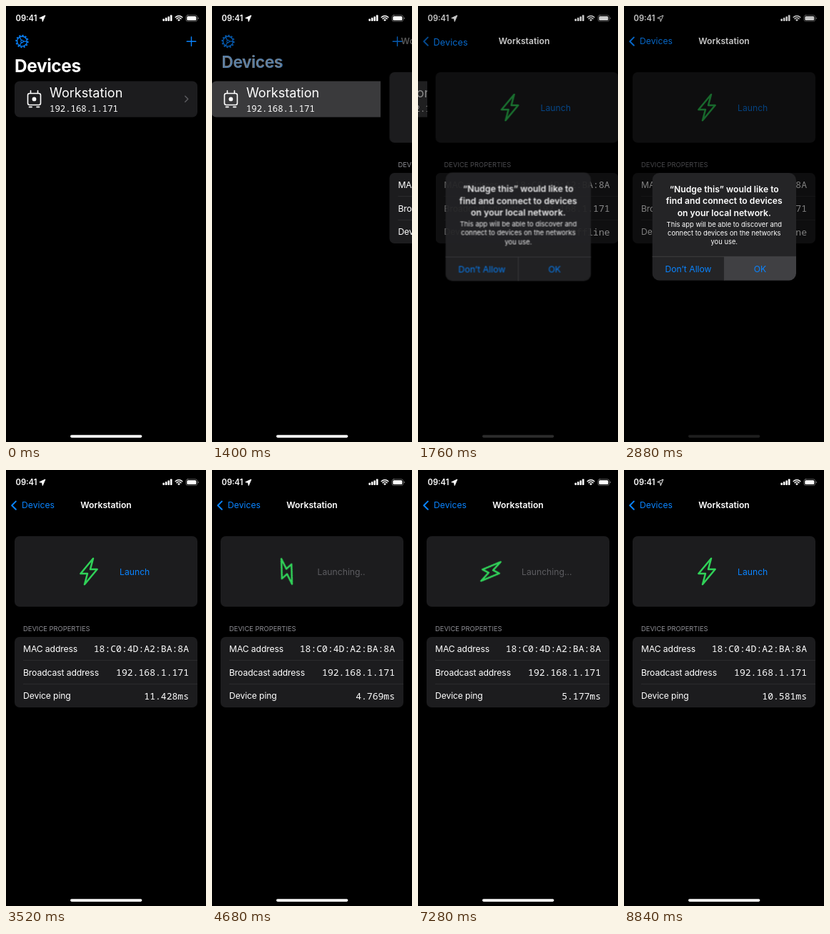
Animation of 280 by 606 pixels, one loop 9000 ms. Source, as an HTML page:

```html
<!DOCTYPE html>
<html lang="en">
<head>
<meta charset="utf-8">
<title>Devices</title>
<style>
html, body { margin: 0; width: 100%; height: 100%; overflow: hidden; background: #000; }
svg { display: block; width: 100%; height: 100%; }
text { font-family: Inter, Roboto, sans-serif; font-size: 12.2px; fill: #fff; white-space: pre; }
.mono { font-family: "Noto Sans Mono", "DejaVu Sans Mono", monospace; font-size: 13.07px; }
.semi { font-weight: 600; }
.mid { text-anchor: middle; }
.end { text-anchor: end; }
.small { font-size: 9.4px; }
.row { letter-spacing: -.12px; }
.blue { fill: #0a84ff; }
.card { fill: #1c1c1e; }
.line { fill: none; stroke-linecap: round; stroke-linejoin: round; }
.rule { stroke: #38383a; stroke-width: .6; }

#list, #detail, #title, #large, #back, #tools, #chevron, #rowcard, #dim, #bars, #home,
#alert, #pressed, #shift, #spin { animation: 9s linear infinite; }
#list, #detail, #title, #large, #back { --push: cubic-bezier(.22, .65, .2, 1); }

#list { animation-name: list; }
@keyframes list {
  0%, 14.667% { transform: translateX(0); animation-timing-function: var(--push); }
  21.333%, 100% { transform: translateX(-84px); }
}
#rowcard { animation-name: rowcard; }
@keyframes rowcard {
  0%, 14.66% { fill: #1c1c1e; }
  14.667%, 100% { fill: #3a3a3c; }
}
#detail { animation-name: detail; }
@keyframes detail {
  0%, 14.667% { transform: translateX(280px); animation-timing-function: var(--push); }
  21.333%, 100% { transform: translateX(0); }
}
#title { animation-name: slide, fadein; }
@keyframes slide {
  0%, 14.667% { transform: translateX(190px); animation-timing-function: var(--push); }
  21.333%, 100% { transform: translateX(0); }
}
@keyframes fadein {
  0%, 14.667% { opacity: 0; }
  17.333%, 100% { opacity: 1; }
}
#large { animation-name: shrink, fadeout; }
@keyframes shrink {
  0%, 14.667% { transform: translate(12px, 92px) scale(1); animation-timing-function: var(--push); }
  21.333%, 100% { transform: translate(22px, 53.4px) scale(.49); }
}
@keyframes fadeout {
  0%, 14.667% { opacity: 1; }
  16.444%, 100% { opacity: 0; }
}
#back { animation-name: settle, fadein; }
@keyframes settle {
  0%, 14.667% { transform: translate(12px, 92px) scale(2.05); animation-timing-function: var(--push); }
  21.333%, 100% { transform: translate(22px, 53.4px) scale(1); }
}
#tools { animation-name: tools; }
@keyframes tools {
  0%, 14.667% { opacity: 1; }
  17.333% { opacity: .12; }
  18.5%, 100% { opacity: 0; }
}
#chevron { animation-name: chevron; }
@keyframes chevron {
  0%, 17.333% { opacity: 0; }
  20.5%, 100% { opacity: 1; }
}
#dim { animation-name: dim; }
@keyframes dim {
  0%, 16.222% { opacity: 0; animation-timing-function: cubic-bezier(.22, .65, .2, 1); }
  22.222%, 33.333% { opacity: .5; }
  36.667%, 100% { opacity: 0; }
}
#bars { animation-name: bars; }
@keyframes bars {
  0%, 16.222% { opacity: 1; animation-timing-function: cubic-bezier(.22, .65, .2, 1); }
  22.222%, 33.333% { opacity: .78; }
  36.667%, 100% { opacity: 1; }
}
#home { animation-name: home; }
@keyframes home {
  0%, 16.222% { opacity: 1; animation-timing-function: cubic-bezier(.22, .65, .2, 1); }
  22.222%, 34.5% { opacity: .12; }
  38.889%, 100% { opacity: 1; }
}
#alert { transform-origin: 140.5px 306.5px; animation-name: pop, show; }
@keyframes pop {
  0%, 16.222% { transform: scale(1.2); animation-timing-function: cubic-bezier(.22, .65, .2, 1); }
  22.222%, 100% { transform: scale(1); }
}
@keyframes show {
  0%, 16.222% { opacity: 0; animation-timing-function: cubic-bezier(.22, .65, .2, 1); }
  22.222%, 33.333% { opacity: 1; }
  36.667%, 100% { opacity: 0; }
}
#pressed { animation-name: pressed; }
@keyframes pressed {
  0%, 31.99% { opacity: 0; }
  32%, 100% { opacity: 1; }
}
#shift { animation-name: shift; }
@keyframes shift {
  0%, 48.889% { transform: translateX(0); }
  50.667% { transform: translateX(-9px); }
  52% { transform: translateX(-11.4px); }
  53.333%, 87.111% { transform: translateX(-14px); animation-timing-function: ease-in-out; }
  89.778%, 100% { transform: translateX(0); }
}
#spin { animation-name: spin; }
@keyframes spin {
  0%, 48.889% { transform: rotate(0deg); }
  52% { transform: rotate(138deg); }
  53.778%, 80.889% { transform: rotate(207deg); animation-timing-function: cubic-bezier(.35, .4, .6, 1); }
  90.222%, 100% { transform: rotate(540deg); }
}
</style>
</head>
<body>
<svg viewBox="0 0 280 606" preserveAspectRatio="none">
  <rect width="280" height="606"/>

  <g id="list">
    <rect id="rowcard" class="card" x="12" y="104.5" width="256" height="50" rx="7"/>
    <g class="line" stroke="#fff" stroke-width="1.6">
      <rect x="30.5" y="121.5" width="18" height="16" rx="2.5"/>
      <path d="M34.5 121v-3.2M44.5 121v-3.2M32.5 140.4h3.6M43 140.4h3.6"/>
    </g>
    <circle cx="39.5" cy="129.4" r="2.9" fill="#fff"/>
    <text x="61" y="127.4" style="font-size:18.1px">Workstation</text>
    <text class="mono" x="61" y="147" style="font-size:12.3px">192.168.1.171</text>
    <path class="line" d="M250.8 125.2l4 4-4 4" stroke="#5c5c60" stroke-width="1.5"/>
  </g>

  <g id="detail">
    <rect width="280" height="606"/>
    <rect class="card" x="12" y="92" width="256" height="98" rx="7"/>
    <g id="shift">
      <g transform="translate(116 141)">
        <path id="spin" class="line" stroke="#30d158" stroke-width="2.5"
          d="M6 -18L-11.6 3H-2L-6 18L11.6 -3H2Z"/>
      </g>
      <text id="label" x="159" y="145.6"></text>
    </g>
    <text class="small" x="24" y="224" style="fill:#8d8d93">DEVICE PROPERTIES</text>
    <rect class="card" x="12" y="232" width="256" height="98" rx="7"/>
    <path class="rule" d="M24 264.6H268M24 297.4H268"/>
    <text class="row" x="24" y="252.8">MAC address</text>
    <text class="mono end" x="256" y="253">18:C0:4D:A2:BA:8A</text>
    <text class="row" x="24" y="285.6">Broadcast address</text>
    <text class="mono end" x="256" y="285.8">192.168.1.171</text>
    <text class="row" x="24" y="318.4">Device ping</text>
    <text id="ping" class="mono end" x="256" y="318.6"></text>
  </g>

  <rect id="dim" width="280" height="606"/>

  <g id="bars">
    <text class="semi" x="13.5" y="21" style="font-size:11.2px">09:41</text>
    <path id="arrow" class="line" d="M54.6 13.2L46.8 16.8L50.6 17.4L51.2 21.2Z" stroke="#fff" stroke-width="1"/>
    <g fill="#fff">
      <rect x="219.4" y="17.8" width="2.6" height="3.2" rx=".7"/>
      <rect x="222.9" y="16.2" width="2.6" height="4.8" rx=".7"/>
      <rect x="226.4" y="14.4" width="2.6" height="6.6" rx=".7"/>
      <rect x="229.9" y="12.6" width="2.6" height="8.4" rx=".7"/>
      <path d="M242 21.2l-1.9-2a2.7 2.7 0 0 1 3.8 0z"/>
      <rect x="253.3" y="14.2" width="13" height="5.8" rx="1.5"/>
      <path d="M268.7 15.7q1.3.4 1.3 1.4t-1.3 1.4z" opacity=".5"/>
    </g>
    <path class="line" d="M237.2 15.7a6.8 6.8 0 0 1 9.6 0M239 17.7a4.3 4.3 0 0 1 6 0" stroke="#fff" stroke-width="1.5"/>
    <rect class="line" x="251.9" y="12.8" width="15.8" height="8.6" rx="2.6" stroke="#fff" stroke-opacity=".5" stroke-width=".7"/>

    <g id="tools" class="line" stroke="#0a84ff" stroke-width="1.4">
      <circle cx="22.5" cy="49.2" r="6.9"/>
      <circle cx="22.5" cy="49.2" r="8.3" stroke-width="1.7" stroke-linecap="butt" pathLength="24" stroke-dasharray="1 1"/>
      <circle cx="22.5" cy="49.2" r="1.7" stroke-width="1.1"/>
      <path d="M24.2 49.2h5.2M21.6 47.7l-2.6 -4.5M21.6 50.7l-2.6 4.5" stroke-width="1.2"/>
      <path d="M253.2 49.2h12.6M259.5 42.9v12.6"/>
    </g>
    <text id="large" style="font-size:24.4px;font-weight:700;letter-spacing:-.4px">Devices</text>
    <path id="chevron" class="line" d="M13.8 43.6L8.2 49.2L13.8 54.8" stroke="#0a84ff" stroke-width="2"/>
    <text id="back" class="blue">Devices</text>
    <text id="title" class="semi mid" x="140" y="53.4">Workstation</text>
  </g>
  <rect id="home" x="90" y="596.3" width="100.4" height="3.6" rx="1.8" fill="#fff"/>

  <g id="alert">
    <clipPath id="round"><rect x="39.5" y="232" width="201.5" height="149.5" rx="10"/></clipPath>
    <g clip-path="url(#round)">
      <rect x="39" y="231" width="203" height="152" fill="#242426"/>
      <rect id="pressed" x="140.5" y="348.4" width="102" height="35" fill="#404043"/>
      <path d="M39 348.3H242M140.4 348.3V383" stroke="#48484b" stroke-width=".7"/>
    </g>
    <g class="semi mid">
      <text x="140.3" y="259.2">“Nudge this” would like to</text>
      <text x="140.3" y="275.4">find and connect to devices</text>
      <text x="140.3" y="291.6">on your local network.</text>
    </g>
    <g class="mid">
      <text class="small" x="140.3" y="306.6">This app will be able to discover and</text>
      <text class="small" x="140.3" y="318.6">connect to devices on the networks</text>
      <text class="small" x="140.3" y="330.6">you use.</text>
      <text class="blue" x="90" y="369.8">Don’t Allow</text>
      <text class="blue" x="190.5" y="369.8">OK</text>
    </g>
  </g>
</svg>
<script>
const $ = id => document.getElementById(id);
const clock = $("spin").getAnimations()[0];

// Each entry holds from its time until the next one.
const pings = [
  [0, "Offline"], [3400, "11.428ms"], [4400, "4.769ms"], [5400, "4.914ms"],
  [6400, "10.236ms"], [6600, "5.177ms"], [7400, "6.038ms"], [8600, "10.581ms"]
];
const labels = [
  [0, "Launch"], [4400, "Launching"], [4520, "Launching."],
  [4640, "Launching.."], [4800, "Launching..."], [7840, "Launch"]
];
const arrows = [[0, "#fff"], [2400, "none"], [3400, "#fff"], [8200, "none"]];

const at = (steps, t) => steps.filter(s => s[0] <= t).pop()[1];
const write = (el, s) => { if (el.textContent !== s) el.textContent = s; };

function draw() {
  const t = Math.max(0, clock.currentTime || 0) % 9000;
  const label = at(labels, t);
  write($("ping"), at(pings, t));
  write($("label"), label);
  $("label").style.fill = label === "Launch" ? "#0a84ff" : "#5c5c60";
  $("arrow").style.fill = at(arrows, t);
  requestAnimationFrame(draw);
}
draw();
</script>
</body>
</html>
```
